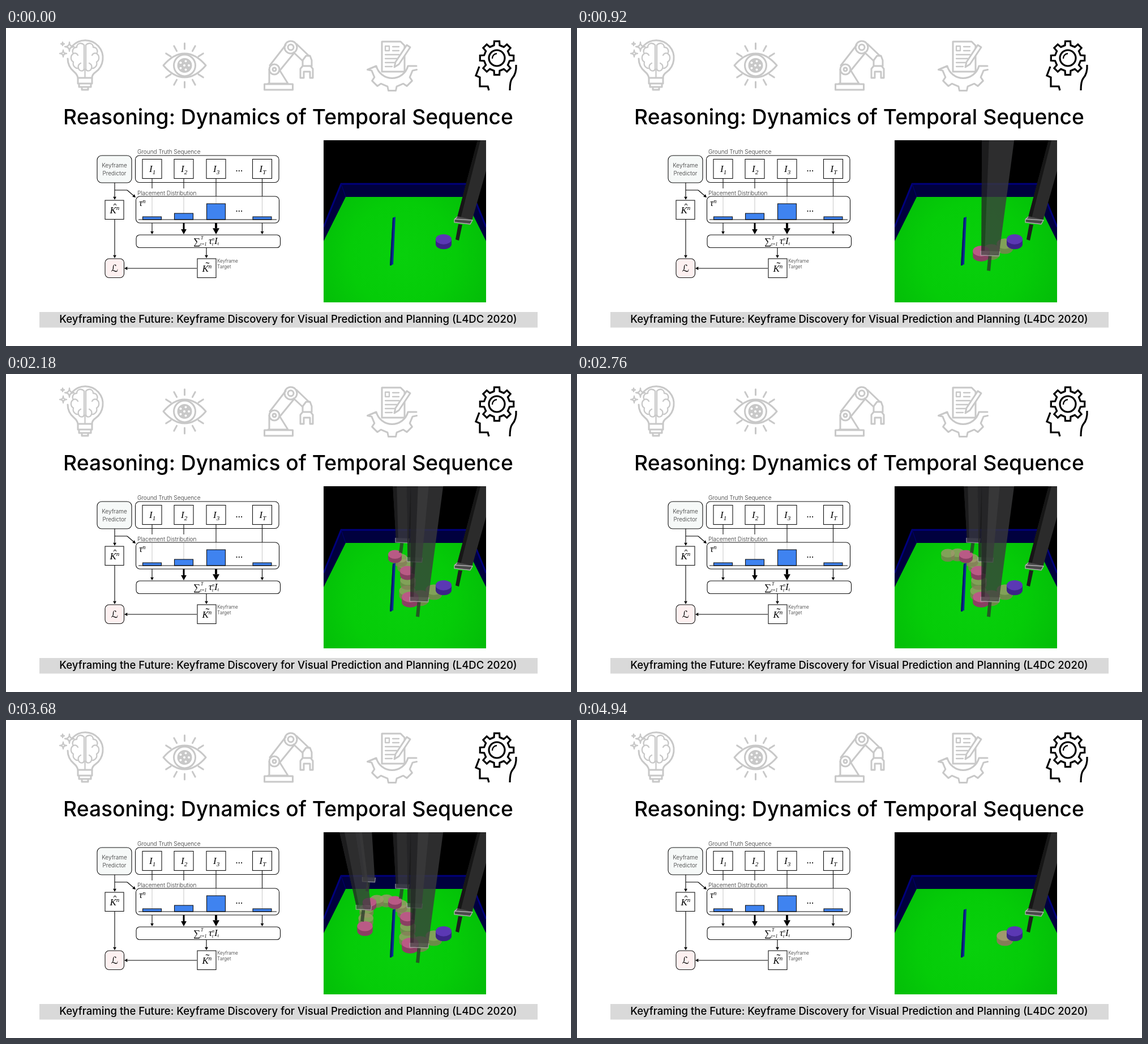
These frames come from a looping animation (998x561 px, 5110 ms). An HTML page:

```html
<!DOCTYPE html>
<html lang="en">
<head>
<meta charset="utf-8">
<title>Reasoning: Dynamics of Temporal Sequence</title>
<style>
html, body { margin: 0; width: 100%; height: 100%; overflow: hidden; background: #fff; }
svg { display: block; width: 998px; height: 561px; }
.head { font: 500 37.2px Inter, sans-serif; text-anchor: middle; }
.foot { font: 500 18.5px Inter, sans-serif; text-anchor: middle; }
.label { font: 300 10px Inter, sans-serif; fill: #333; }
.tiny { font-size: 8.3px; }
.mid { text-anchor: middle; }
.math { font: italic 17px "Liberation Serif", serif; }
.up { font-size: 11px; }
.idx { font-size: 8px; }
.script { font: italic 17px "DejaVu Sans", sans-serif; text-anchor: middle; }
.line { fill: none; stroke: #111; stroke-width: 1.1; }
.icon { fill: none; stroke: #c8c8c8; stroke-width: 3; stroke-linejoin: round; stroke-linecap: round; }
.thin { stroke-width: 2.3; }
.dark { stroke: #000; stroke-width: 3.2; stroke-linecap: butt; stroke-linejoin: miter; }
</style>
</head>
<body>
<svg viewBox="0 0 998 561">
  <defs>
    <radialGradient id="floor" gradientUnits="userSpaceOnUse" cx="700" cy="400" r="185">
      <stop offset="0" stop-color="#08d00c"/>
      <stop offset=".5" stop-color="#05cc08"/>
      <stop offset="1" stop-color="#03b908"/>
    </radialGradient>
    <clipPath id="view"><rect x="561" y="198" width="287" height="286"/></clipPath>
  </defs>
  <rect width="998" height="561" fill="#fff"/>
  <g id="icons"></g>
  <text class="head" x="498.5" y="170">Reasoning: Dynamics of Temporal Sequence</text>
  <g id="diagram"></g>
  <g id="scene" clip-path="url(#view)"></g>
  <rect x="59" y="501" width="880" height="27.5" fill="#d9d9d9"/>
  <text class="foot" x="498.5" y="520">Keyframing the Future: Keyframe Discovery for Visual Prediction and Planning (L4DC 2020)</text>
</svg>
<script>
const $ = id => document.getElementById(id);
const path = (d, attrs = '') => `<path d="${d}" ${attrs}/>`;
const poly = (pts, fill) => `<polygon points="${pts}" fill="${fill}"/>`;
const circle = (x, y, r, attrs = '') => `<circle cx="${x}" cy="${y}" r="${r}" ${attrs}/>`;
const box = (x, y, w, h, r = 0, fill = '#fff') =>
  `<rect class="line" x="${x}" y="${y}" width="${w}" height="${h}" rx="${r}" style="fill:${fill}"/>`;
const text = (x, y, s, cls) => `<text x="${x}" y="${y}" class="${cls}">${s}</text>`;
const polar = (cx, cy, r, a) => `${(cx + r * Math.cos(a)).toFixed(1)} ${(cy + r * Math.sin(a)).toFixed(1)}`;

// ---- icons ----
function gear(cx, cy, inner, outer, half) {
  const pts = [];
  for (let k = 0; k < 8; k++) {
    for (const o of [-.28, -.19, .19, .28]) {
      const a = (k + o) * Math.PI / 4;
      if (!half || Math.sin(a) >= 0) pts.push(polar(cx, cy, Math.abs(o) > .2 ? inner : outer, a));
    }
  }
  return 'M' + pts.join('L');
}

const spark = (x, y, r) =>
  path(`M${x} ${y - r}Q${x} ${y} ${x + r} ${y}Q${x} ${y} ${x} ${y + r}Q${x} ${y} ${x - r} ${y}Q${x} ${y} ${x} ${y - r}Z`);

const lobe = path(`M138 30C132 24 125 28 125 34C118 34 116 41 119 45C113 49 114 57 119 60C117 67 123 72 128 71
  C130 77 137 77 138 72ZM119 45Q124 43 127 48M128 71Q126 65 132 62`);
const bulb = `<g class="icon">
  ${path('M117 32A31 31 0 1 1 158 78Q152 82 152 88H127Q126 82 120 77Q109 68 109 54')}
  ${path('M127 88V98H152V88M129 98V104H150V98M134 105V109H145V105')}
  <g class="thin">${lobe}<g transform="matrix(-1 0 0 1 279 0)">${lobe}</g>${path('M139.5 73V87')}
  ${spark(112, 33, 8)}${spark(101, 45, 6)}${spark(100, 28, 3)}</g></g>`;

let rays = '', spots = circle(315, 66, 2);
for (let k = -2; k <= 2; k++) {
  for (const side of [-1, 1]) {
    const a = side * (Math.PI / 2 + k * .5);
    rays += `M${polar(315.5, 66, 29, a)}L${polar(315.5, 66, 39, a)}`;
  }
  const [x, y] = polar(315, 66, 8, k * Math.PI * .4).split(' ');
  spots += circle(x, y, 2);
}
const eye = `<g class="icon">${path(rays)}
  ${path('M278 66Q296 45 315.5 45T353 66Q335 87 315.5 87T278 66Z')}
  ${circle(315.5, 66, 19)}${circle(315.5, 66, 13, 'fill="#c8c8c8" stroke="none"')}
  <g fill="#fff" stroke="none">${spots}</g></g>`;

const robot = `<g class="icon">
  ${path('M456.500 99H506.500V109H456.500ZM465 98V73M483 74L498 98M463 98H498'.replaceAll('.500', '.5'))}
  ${path('M466 66L494 30M482 77L509 44M513 28L535 49M508 43L524 58')}
  ${circle(474, 73, 9)}${circle(474, 73, 3)}${circle(503, 34, 11)}${circle(503, 34, 5)}
  ${path('M524 57L530 49H537L540 57V67H524ZM524 67L520 72V88H526V77H537V88H542V72L538 67')}</g>`;

const rows = [33, 40, 47, 54, 61, 68].map((y, i) => `M${i < 2 ? 683 : 670} ${y}H${694 - Math.max(0, i - 2) * 4}`).join('');
const doc = `<g class="icon">
  ${path(gear(682, 67, 37, 44, true) + 'L654 67A29 29 0 0 0 710 67L725 67')}
  ${path('M664 77V24H697L704 31V77Z', 'style="fill:#fff"')}
  <g class="thin">${path('M670 32H677V40H670Z' + rows)}</g>
  ${path('M708 30L714 34L694 64L686 69L688 60Z', 'style="fill:#fff"')}</g>`;

const mind = `<g class="icon dark">
  ${path(gear(867, 53, 23, 30) + 'Z')}${circle(867, 53, 14)}
  ${path('M859 54A8.5 8.5 0 0 1 867 45', 'class="thin"')}
  ${path('M836 68L830 84L837 87V103H851L853 110M901 65Q902 80 894 89Q890 94 890 110')}</g>`;

$('icons').innerHTML = bulb + eye + robot + doc + mind;

// ---- diagram ----
function arrow(x1, y1, x2, y2, w = 1.1) {
  const a = Math.atan2(y2 - y1, x2 - x1), head = 3.2 + 1.9 * w;
  const c = Math.cos(a), s = Math.sin(a), h = head * .55, bx = x2 - head * c, by = y2 - head * s;
  return path(`M${x1} ${y1}L${bx} ${by}`, `stroke="#000" stroke-width="${w}"`) +
    poly(`${x2},${y2} ${bx - h * s},${by + h * c} ${bx + h * s},${by - h * c}`, '#000');
}
const line = (d, color = '#111') => path(d, `class="line" style="stroke:${color}"`);
const span = (s, cls, dy) => `<tspan class="${cls}" dy="${dy}">${s}</tspan>`;

function bigK(x, y, mark) {
  return box(x, y, 33, 33.5) + text(x + 8.5, y + 23, 'K' + span('n', 'up', -6), 'math') +
    `<g transform="translate(${x + 15} ${y + 6})">${line(mark)}</g>`;
}

function column(x, name, height, weight) {
  return box(x - 17, 231.5, 34, 34) + text(x - 5, 254, 'I' + span(name, 'up', 4), 'math') +
    line(`M${x} 265.5V${x < 340 ? 283 : 297}`) + line(`M${x} 298V338`, '#ccc') +
    box(x - 16.5, 338 - height, 33, height, 0, '#3f83f0') + arrow(x, 344, x, 364, weight);
}

const dots = y => [0, 1, 2].map(i => circle(407.5 + 4.3 * i, y, 1.1)).join('');

$('diagram').innerHTML =
  box(161, 225, 61, 48, 8, '#f6f9f8') + box(228.5, 225, 253.5, 47.5, 7) + box(229.5, 297, 253, 47, 7) +
  text(232, 222, 'Ground Truth Sequence', 'label') + text(232, 294.5, 'Placement Distribution', 'label') +
  text(191.5, 246, 'Keyframe', 'label mid') + text(191.5, 260, 'Predictor', 'label mid') +
  column(258, '1', 5, 1.1) + column(314, '2', 11, 3) + column(371, '3', 28, 4) + column(452.5, 'T', 5, 1.1) +
  line('M234 338H478') + dots(252) + dots(323) +
  text(235, 314, 'τ' + span('n', 'up', -5), 'math') +
  box(230, 365, 254.5, 22.5, 6) +
  text(331, 382, '∑', 'math') + text(344, 373, 'T', 'math idx') + text(343, 384, 't=1', 'math idx') +
  text(358, 381, 'τ', 'math') + text(364, 375, 'n', 'math idx') + text(364, 384, 't', 'math idx') +
  text(368, 381, 'I' + span('t', 'idx', 2), 'math') +
  arrow(192, 273, 192, 303) + arrow(192, 338, 192, 406) + arrow(354, 388, 354, 406) + arrow(337, 424, 209, 424) +
  line('M192 286H214') + arrow(214, 286, 229, 299) +
  bigK(175, 304, 'M0 3L2.5 0L5 3') + bigK(338, 407, 'M0 2Q1.500 0 3 1.500T6 1') +
  box(175, 407, 33.5, 33.5, 7, '#fdf0f0') + text(191.8, 430, 'ℒ', 'script') +
  text(373, 414, 'Keyframe', 'label tiny') + text(373, 424, 'Target', 'label tiny');

// ---- simulated table ----
// puck position, arm collar position and the step at which each key pose appears
const poses = [
  { puck: [773, 377], step: 0 },
  { puck: [714, 398], collar: [730, 397], step: 3 },
  { puck: [709, 351], collar: [722, 327], step: 5 },
  { puck: [687, 322], collar: [700, 293], step: 7 },
  { puck: [642, 325], collar: [641, 281], step: 10 },
  { puck: [634, 368], collar: [632, 330], step: 12 },
  { puck: [620, 397], collar: [616, 358], step: 14 }];

function disc([x, y], top, side) {
  const r = 12 + (y - 322) * .037, ry = r * .64, h = r * .62, t = y - h / 2;
  return path(`M${x - r} ${t}V${t + h}A${r} ${ry} 0 0 0 ${x + r} ${t + h}V${t}Z`, `fill="${side}"`) +
    `<ellipse cx="${x}" cy="${t}" rx="${r}" ry="${ry}" fill="${top}"/>`;
}

// nearer arms (lower on screen) are wider and spread away from the centre line
function arm([x, y]) {
  const half = 11.5 + (y - 281) * .045, spread = 1 + (y - 240) * .0035;
  const topX = 705 + (x - 705) * spread, topHalf = half * spread * 1.1;
  const l = x - half, r = x + half, tl = topX - topHalf, tr = topX + topHalf;
  const rod = half * 1.9;
  return '<g opacity=".78">' +
    poly(`${x - 3},${y} ${x + 3},${y} ${x},${y + rod} ${x - 6},${y + rod - 1}`, '#2c3a2c') +
    poly(`${tl},198 ${tr},198 ${r - 1},${y} ${l + 1},${y}`, '#3a3a3c') +
    poly(`${tl},198 ${tl + topHalf * .44},198 ${l + half * .4},${y} ${l + 1},${y}`, '#242426') +
    poly(`${l},${y - 4} ${r},${y - 3} ${r - 1},${y + 5} ${l},${y + 4}`, '#4c4c4c') +
    path(`M${l} ${y - 4}V${y + 4}L${r - 1} ${y + 5}L${r} ${y - 3}`, 'fill="none" stroke="#aaa" stroke-width="1.3"') + '</g>';
}

// smooth curve through neighbouring points
function curve(p0, p1, p2, p3, u) {
  return p1.map((b, i) => {
    const a = p0[i], c = p2[i], e = p3[i];
    return b + .5 * u * (c - a + u * (2 * a - 5 * b + 4 * c - e + u * (3 * (b - c) + e - a)));
  });
}

const since = (step, body, cls = '') => `<g data-step="${step}" class="${cls}">${body}</g>`;
const puckAt = i => poses[Math.max(0, Math.min(poses.length - 1, i))].puck;

function trail() {
  let out = '';
  for (let i = 1; i < poses.length; i++) {
    for (const j of [1, 2]) {
      const p = curve(puckAt(i - 2), puckAt(i - 1), puckAt(i), puckAt(i + 1), j / 3);
      out += since(Math.min(poses[i - 1].step + j, poses[i].step), disc(p, '#a0986c', '#857d58'), 'trail');
    }
  }
  return out;
}

const table = '<rect x="561" y="198" width="287" height="286" fill="#000"/>' +
  poly('592,274 817,274 848,350 848,484 561,484 561,350', '#00003e') +
  poly('600,298 809,298 848,376 848,484 561,484 561,376', 'url(#floor)') +
  path('M561 351L592 275H817L848 351', 'fill="none" stroke="#00007c" stroke-width="3"') +
  path('M592 275L600 298M817 275L809 298', 'stroke="#000068" stroke-width="1.2"');
const barrier = poly('683,335 688,333 684,417 678,419', '#0a2b98') + poly('683,335 685,334 681,419 678,419', '#081a66');
const pushes = poses.slice(1).sort((a, b) => a.collar[1] - b.collar[1])
  .map(p => since(p.step, disc(p.puck, '#b95a85', '#8a4062') + arm(p.collar))).join('');
const mainArm = poly('799,346 806,347 800,375 794,373', '#1c211c') +
  poly('833,198 850,198 850,245 823,340 797,334', '#2b2b2b') + poly('833,198 838,198 803,336 797,334', '#161616') +
  poly('792,337 797,332 824,338 820,347 793,343', '#4a4a4a') +
  path('M797 333L792 338V343L820 346L824 339L792 337', 'fill="none" stroke="#b4b4b4" stroke-width="1.3"');
$('scene').innerHTML = table + trail() + barrier + pushes + disc(poses[0].puck, '#5b38b4', '#3b2388') + mainArm;

// ---- timeline ----
const steps = [340, 630, 920, 1260, 1550, 1840, 2180, 2470, 2760, 3100, 3390, 3680, 4020, 4310, 4600, 4940];
const loop = 5110, reset = 15;
const parts = [...document.querySelectorAll('[data-step]')];
const start = performance.now();

function draw() {
  const t = (performance.now() - start) % loop;
  const now = steps.filter(at => at <= t).length % reset;
  for (const p of parts) {
    p.style.visibility = now >= +p.dataset.step ? 'visible' : 'hidden';
    if (p.classList.contains('trail')) p.style.opacity = now >= poses[1].step ? .8 : 1;
  }
  requestAnimationFrame(draw);
}
draw();
</script>
</body>
</html>
```
